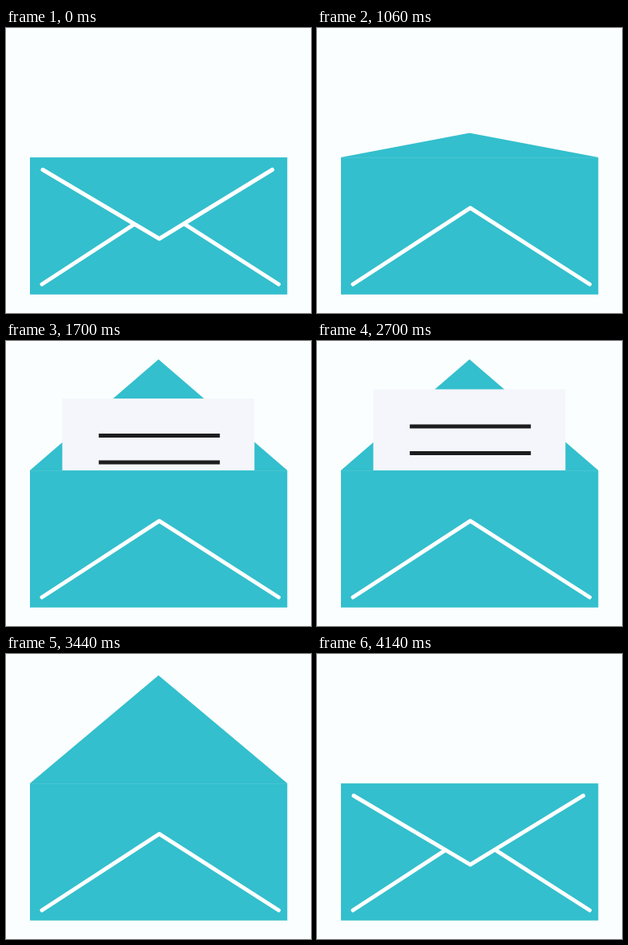
Write an HTML page that moves like this. It is 382 px wide and 357 px high and loops after 4200 ms.

```html
<!DOCTYPE html>
<html lang="en">
<head>
<meta charset="utf-8">
<title>Envelope</title>
<style>
  html, body { margin: 0; width: 100%; height: 100%; overflow: hidden; background: #fafeff; }
  svg { display: block; width: 382px; height: 357px; }
  .teal { fill: #33bfcd; }
  .fold { stroke: #fff; stroke-width: 5; stroke-linecap: round; stroke-linejoin: round; }
</style>
</head>
<body>
<svg viewBox="0 0 382 357">
  <clipPath id="pocket"><rect width="382" height="162.1"/></clipPath>
  <path id="flap" class="teal"/>
  <g clip-path="url(#pocket)">
    <g id="letter">
      <rect x="70.5" width="240.7" height="160" fill="#f5f6fb"/>
      <path d="M116.2 46.5H267.8M116.2 80H267.8" stroke="#1d1d1f" stroke-width="5"/>
    </g>
  </g>
  <rect class="teal" x="30" y="162.1" width="322.3" height="171.7"/>
  <path class="fold" fill="none" d="M45 321L192 225.3L341.5 321"/>
  <path id="seal" class="teal fold"/>
</svg>
<script>
const LOOP = 4200, TURN = 440, SLIDE = 830, BASE = 162.1;
const [flap, letter, seal] = ['flap', 'letter', 'seal'].map(id => document.getElementById(id));

const clamp = u => Math.min(1, Math.max(0, u));
const mix = (a, b, k) => a + (b - a) * k;
const easeIn = (t, start, length) => clamp((t - start) / length) ** 3;
const easeOut = (t, start, length) => 1 - (1 - clamp((t - start) / length)) ** 3;

function draw(t) {
  const opening = t < 2400;
  const raised = opening ? easeOut(t, 1026, TURN) : 1 - easeIn(t, 3308, TURN);
  const shown = opening ? easeOut(t, 1275, SLIDE) : 1 - easeIn(t, 2602, SLIDE);
  const sealed = opening ? 1 - easeIn(t, 588, TURN) : easeOut(t, 3748, TURN);

  flap.setAttribute('d', `M30 ${BASE}L191 ${mix(BASE, 23, raised)}L352.3 ${BASE}Z`);
  letter.setAttribute('transform', `translate(0 ${mix(162.3, 60.3, shown)})`);

  const side = mix(170.5, 177.5, sealed);
  seal.setAttribute('d',
    `M${mix(40, 46, sealed)} ${side}L192 ${mix(170.5, 264, sealed)}L${mix(342, 333.5, sealed)} ${side}`);
  seal.style.strokeWidth = 5 * sealed;
  seal.style.display = sealed ? '' : 'none';
}

const begin = performance.now();
function tick() {
  draw((performance.now() - begin) % LOOP);
  requestAnimationFrame(tick);
}
tick();
</script>
</body>
</html>
```
